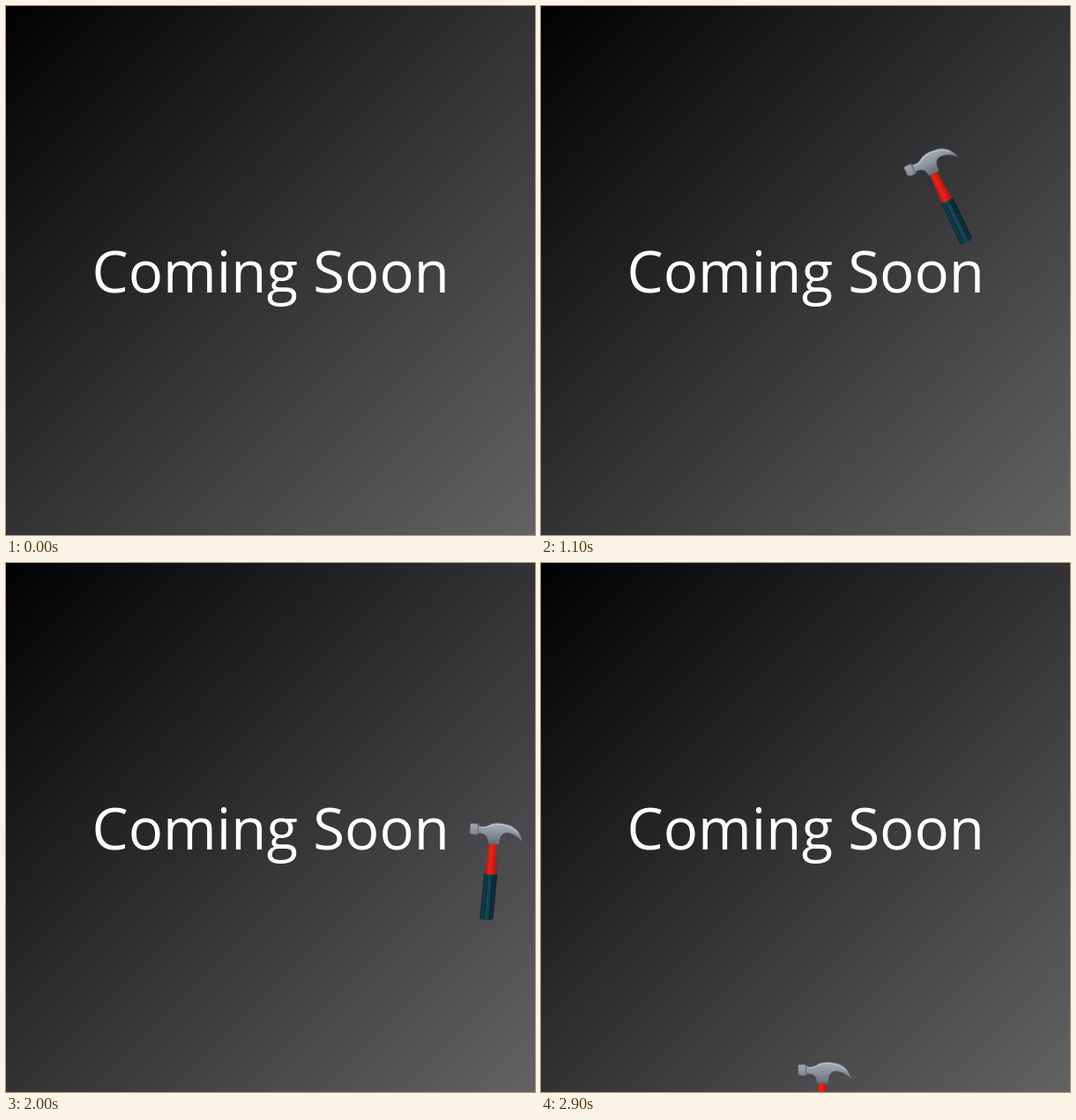
Write an HTML page that moves like this. It is 600 px wide and 600 px high and loops after 3 s.

```html
<!DOCTYPE html>
<html lang="en">
<head>
<meta charset="utf-8">
<title>Coming Soon</title>
<style>
  html, body { margin: 0; width: 100%; height: 100%; overflow: hidden; background: #000; }
  svg { display: block; width: 100vw; height: 100vh; }
  text { font: 400 65.3px "Open Sans", "Noto Sans", sans-serif; fill: #fff; text-anchor: middle; }
</style>
</head>
<body>
<svg viewBox="0 0 600 600">
  <defs>
    <linearGradient id="back" x2="1" y2="1">
      <stop stop-color="#010002"/>
      <stop offset=".5" stop-color="#323134"/>
      <stop offset="1" stop-color="#646364"/>
    </linearGradient>
    <linearGradient id="steel" x2="0" y2="1">
      <stop stop-color="#a9aeb6"/>
      <stop offset=".5" stop-color="#8b919a"/>
      <stop offset="1" stop-color="#666d77"/>
    </linearGradient>
    <linearGradient id="red">
      <stop stop-color="#a8150f"/>
      <stop offset=".4" stop-color="#e8251b"/>
      <stop offset="1" stop-color="#a3130e"/>
    </linearGradient>
    <linearGradient id="grip">
      <stop stop-color="#0b2a33"/>
      <stop offset=".4" stop-color="#164b57"/>
      <stop offset="1" stop-color="#09242c"/>
    </linearGradient>
  </defs>
  <rect width="600" height="600" fill="url(#back)"/>
  <text x="300.2" y="325">Coming Soon</text>
  <!-- handle axis at x = 0, middle of the hammer at the origin -->
  <g id="hammer">
    <path fill="url(#red)" d="M-4.5-32H5Q5-15 7.5 4H-7Q-4-15-4.5-32Z"/>
    <path fill="url(#grip)" d="M-7 3Q0 5 8 3L7.5 53Q6 56 0 56T-8 54Z"/>
    <path fill="none" stroke="#082027" d="M-2.5 6L-3 54M3.5 6L3 54"/>
    <path fill="url(#steel)" stroke="#565d66" stroke-width=".7"
      d="M-27-52Q-22-53-18-52L-16-50Q-10-49-6-52Q0-56 10-55Q29-54 33.5-36Q26-44 16-45Q9-44 8-38L7-31H-5L-7-38Q-10-42-16-42L-18-40Q-23-39-27-41Z"/>
    <path fill="none" stroke="#c3c8ce" d="M-15-49Q-9-48-5-51Q0-54 10-53.5Q22-52 28-45"/>
    <path fill="none" stroke="#5c636c" d="M-18-52V-40"/>
  </g>
</svg>
<script>
const LOOP = 3000, STEP = 100;
const START = 100, SWEEP = 400, FLIP = 1050, STRIKE = 1200, FALL = 2000;
const hammer = document.getElementById("hammer");
const mix = (a, b, k) => a + (b - a) * k;

function windUp(t) {
  const k = (t - START) / (SWEEP - START);
  return { x: mix(50, 72, k), y: 252, angle: mix(-32, -30, k) };
}

// Arc over the words
function sweep(t) {
  const k = (t - SWEEP) / (STRIKE - SWEEP);
  return {
    x: mix(72, 535, k ** 1.35),
    y: 252 - 55 * Math.sin(.9 * Math.PI * k),
    angle: -30 + 10 * Math.sin(Math.PI * k)
  };
}

// Two blows, 400 ms each
function strike(t) {
  const k = (1 - Math.cos((t - STRIKE) / 400 * 2 * Math.PI)) / 2;
  return { x: mix(535, 507, k), y: mix(235, 248.5, k), angle: mix(-30, -101, k) };
}

// Slow slide, a quick move to the left, then a drop
function fall(t) {
  const k = (t - FALL) / 1000;
  return {
    x: mix(549.5, 318.5, 1 / (1 + Math.exp((.484 - k) / .044))),
    y: 349.5 + 120 * k + 308 * k ** 6,
    angle: 4.6 * (1 - k) ** 2
  };
}

function draw(now) {
  const t = Math.floor(now % LOOP / STEP) * STEP;
  hammer.style.display = t < START ? "none" : "";
  const act = t < SWEEP ? windUp : t < STRIKE ? sweep : t < FALL ? strike : fall;
  const { x, y, angle } = act(t);
  const side = t < FLIP ? -1 : 1;
  hammer.setAttribute("transform", `translate(${x} ${y}) scale(${side} 1) rotate(${angle})`);
}

const start = performance.now();
function tick() {
  draw(performance.now() - start);
  requestAnimationFrame(tick);
}
tick();
</script>
</body>
</html>
```
